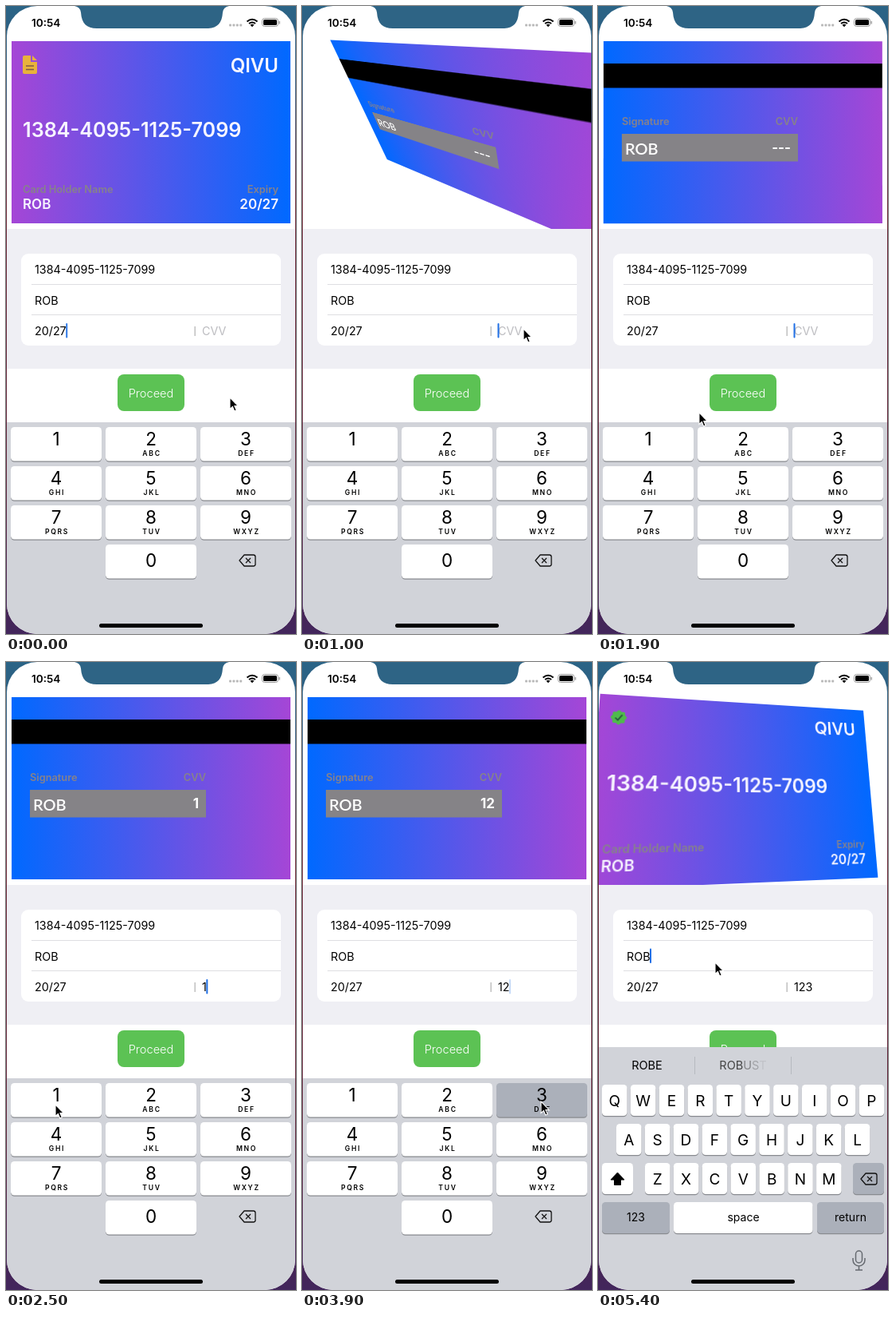
Write an HTML page that moves like this. It is 364 px wide and 786 px high and loops after 5.5 s.

```html
<!DOCTYPE html>
<html lang="en">
<head>
<meta charset="utf-8">
<title>Card form</title>
<style>
html, body { margin: 0; width: 100%; height: 100%; overflow: hidden; }
body { background: linear-gradient(#2b6486, #31587c 12%, #6a2434 32%, #5c2138 75%, #42265c); }
#screen { position: absolute; left: 1px; top: 0; width: 362px; height: 786px; border-radius: 38px; overflow: hidden; background: #fff; }
svg { position: absolute; font-family: Inter, "Open Sans", sans-serif; }
#ui { left: -1px; top: 0; }
.card { left: 6px; top: 44px; overflow: visible; }
</style>
</head>
<body>
<div id="screen">
  <svg class="card" id="front" width="350" height="228"></svg>
  <svg class="card" id="back" width="350" height="228"></svg>
  <svg id="ui" width="364" height="786"></svg>
</div>
<script>
const $ = id => document.getElementById(id);
const NAME = 'ROB', NUMBER = '1384-4095-1125-7099', EXPIRY = '20/27';

const text = (x, y, size, str, attrs = '') => `<text x="${x}" y="${y}" font-size="${size}" ${attrs}>${str}</text>`;
const rect = (x, y, w, h, fill, r = 0, attrs = '') =>
  `<rect x="${x}" y="${y}" width="${w}" height="${h}" rx="${r}" fill="${fill}" ${attrs}/>`;
const gradient = (id, from, to) => `<linearGradient id="${id}"><stop stop-color="${from}"/>
  <stop offset="1" stop-color="${to}"/></linearGradient>${rect(0, 0, 350, 228, `url(#${id})`)}`;
const MID = 'text-anchor="middle"', WHITE = 'fill="#f7f5ff" font-weight="600"',
  LABEL = 'fill="#87828a" font-weight="600"', END = 'text-anchor="end"';

// Card faces
const seal = Array.from({ length: 32 }, (_, i) => {
  const a = i * Math.PI / 16, r = 8.6 + 0.9 * Math.cos(8 * a);
  return `${(23 + r * Math.cos(a)).toFixed(1)},${(29 + r * Math.sin(a)).toFixed(1)}`;
}).join(' ');

$('front').innerHTML = gradient('frontFill', '#a546d6', '#0069ff') +
  `<g id="pending"><path d="M16 18h8v8h8v13q0 2-2 2H16q-2 0-2-2V20q0-2 2-2zM26 18l6 6h-6z" fill="#e8b23c"/>
   <path d="M18 31h10M18 35.500h10" stroke="#7d5a48" stroke-width="1.500"/></g>
   <g id="ready"><polygon points="${seal}" fill="#4fba4c"/>
   <path d="M19 29.500l3 3 5-7" fill="none" stroke="#24503c" stroke-width="1.700"/></g>` +
  text(335, 38.5, 24, 'QIVU', `${WHITE} ${END}`) +
  text(14, 119.5, 25.2, NUMBER, WHITE) +
  text(14, 190, 12.8, 'Card Holder Name', LABEL) + text(14, 210, 17, NAME, WHITE) +
  text(335, 190, 12.8, 'Expiry', `${LABEL} ${END}`) + text(335, 210, 17, EXPIRY, `${WHITE} ${END}`);

$('back').innerHTML = gradient('backFill', '#0069ff', '#a546d6') +
  rect(0, 28, 350, 30.5, '#000') + rect(23, 116, 221, 34.5, '#858387') +
  text(23, 105, 12.8, 'Signature', LABEL) + text(244, 105, 12.8, 'CVV', `${LABEL} ${END}`) +
  text(27, 142, 20, NAME, 'fill="#fff" font-weight="600" style="font-family:Lato,cursive"') +
  text(235, 139.5, 17, '', `fill="#fff" font-weight="700" ${END} id="cardCvv"`);

// Keyboards
const SHADOW = '#898b90', GREY = '#abb0ba';
const key = (x, y, w, h, fill = '#fff', id = '') =>
  rect(x, y + 1.2, w, h, SHADOW, 4.5) + rect(x, y, w, h, fill, 4.5, id && `id="${id}"`);
const erase = (x, y) => `<path d="M${x - 10} ${y}l6-7h11.500q2.500 0 2.500 2.500v9q0 2.500-2.500 2.500H${x - 4}z
  M${x - 2} ${y - 3}l6 6m0-6l-6 6" fill="none" stroke="#111" stroke-width="1.300" stroke-linejoin="round"/>`;

const padLetters = ['', 'ABC', 'DEF', 'GHI', 'JKL', 'MNO', 'PQRS', 'TUV', 'WXYZ'];
let pad = rect(0, 521, 364, 265, '#d1d3d9');
padLetters.forEach((letters, i) => {
  const x = 6 + i % 3 * 119, y = 527 + Math.floor(i / 3) * 49;
  pad += key(x, y, 114, 42.5, '#fff', 'key' + (i + 1)) + text(x + 57, y + 23, 22.5, i + 1, MID) +
    text(x + 58, y + 36, 8.6, letters, `${MID} font-weight="600" letter-spacing="1.700"`);
});
pad += key(125, 674, 114, 42.5) + text(182, 702, 22.5, 0, MID) + erase(303, 694);

const letterRow = (chars, x, y) => [...chars].map((c, i) =>
  key(x + i * 35.85, y, 31.5, 39) + text(x + i * 35.85 + 15.75, y + 26.5, 19, c, MID)).join('');
const faded = [...'UST'].map((c, i) => `<tspan fill-opacity="${0.55 - i * 0.22}">${c}</tspan>`).join('');
const letterKeys = rect(0, 482, 364, 304, '#d1d3d9') +
  rect(121, 494, 1, 22, '#b7bac0') + rect(242, 494, 1, 22, '#b7bac0') +
  text(61.5, 510, 14.5, 'ROBE', MID) + text(182, 510, 14.5, NAME + faded, `${MID} fill="#444"`) +
  letterRow('QWERTYUIOP', 5, 529) + letterRow('ASDFGHJKL', 23, 578) + letterRow('ZXCVBNM', 59, 627) +
  key(5, 627, 39, 39) + '<path d="M24.500 639l8.500 9h-4.500v6.500h-8V648H16z" stroke="#000" stroke-linejoin="round"/>' +
  key(320, 627, 39, 39, GREY) + erase(340, 647) +
  key(5, 676, 85, 39, GREY) + text(47.5, 700, 14, '123', MID) +
  key(95, 676, 174.5, 39) + text(182.5, 699.5, 14, 'space', MID) +
  key(275, 676, 84, 39, GREY) + text(317, 699.5, 14, 'return', MID) +
  `<g fill="none" stroke="#666a70" stroke-width="1.500">${rect(323.5, 737, 8, 15, 'none', 4)}
   <path d="M320 746v2.500a7.500 7.500 0 0 0 15 0V746M327.500 756v5M323 761h9"/></g>`;

// Form, status bar and pointer
const FIELD = 14.3;
$('ui').innerHTML =
  rect(0, 279, 364, 175, '#efeff4') + rect(0, 454, 364, 67, '#fff') + rect(19, 310, 326, 115, '#fff', 9) +
  rect(32, 348, 313, 1, '#dedee2') + rect(32, 386, 313, 1, '#dedee2') +
  text(36, 334.5, FIELD, NUMBER) +
  text(36, 373.5, FIELD, NAME, 'id="name"') + text(36, 412, FIELD, EXPIRY, 'id="expiry"') +
  rect(236.6, 401, 1.1, 12, '#aaa') +
  text(246, 412, FIELD, 'CVV', 'id="hint" fill="#bcbcc0"') + text(246, 412, FIELD, '', 'id="cvv"') +
  rect(0, 0, 2, 18.5, '#1f6fe5', 1, 'id="caret"') +
  rect(140, 461, 84, 46, '#5cc254', 8) + text(182, 489.5, 14.6, 'Proceed', `${MID} fill="#fff" font-weight="300"`) +
  `<g>${pad}</g><g id="letters">${letterKeys}</g>` + rect(117, 773, 130, 5, '#000', 2.5) +
  '<path d="M86 0Q93 1 94 8C95 22 101 28 114 28H252C265 28 271 22 272 8Q273 1 280 0Z" fill="#2e6485"/>' +
  text(32, 25.5, 13.6, '10:54', 'font-weight="600"') +
  [0, 1, 2, 3].map(i => rect(280 + i * 4.4, 22.5, 3, 3, '#b9b9b9', 1)).join('') +
  `<g fill="none" stroke="#000" stroke-width="2"><path d="M302.500 19.500q6.500-5.500 13 0M305 22q4-3 8 0"/></g>
   <path d="M306.500 23.600q2.500-1.600 5 0l-2.500 2.600z"/>` +
  rect(321.5, 15.5, 20, 10, 'none', 3, 'stroke="#999"') + rect(323, 17, 17, 7, '#000', 1.6) + rect(342.7, 19, 1.3, 3.5, '#999') +
  '<path id="pointer" d="M0 0V14.500L3.400 11.500L5.700 17L8.200 16L5.900 10.600H10.300Z" stroke="#fff" stroke-width="1.100"/>';

// Timeline, in seconds
const FLIP = 0.698, UNFLIP = 4.96;
const typed = [2.4, 3.05, 3.92];
const pointerPath = [[0, 281, 490], [0.1, 281, 490], [0.55, 278, 404], [1.55, 278, 404], [2.1, 62, 554], [2.5, 62, 554],
  [2.9, 168, 553], [3.3, 168, 553], [3.7, 300, 550], [4, 300, 550], [4.7, 139, 360], [4.8, 139, 360], [4.95, 147, 376], [5.5, 147, 376]];

const clamp = v => Math.max(0, Math.min(1, v));
const smooth = v => v * v * (3 - 2 * v);

function spring(t) {
  if (t <= 0) return 0;
  const damping = 0.7, omega = 2 * Math.PI, k = Math.sqrt(1 - damping * damping), a = omega * k * t;
  return 1 - Math.exp(-damping * omega * t) * (Math.cos(a) + damping / k * Math.sin(a));
}

function pointerAt(t) {
  const i = Math.max(1, pointerPath.findIndex(p => p[0] >= t));
  const [t0, x0, y0] = pointerPath[i - 1], [t1, x1, y1] = pointerPath[i];
  const s = smooth(clamp((t - t0) / (t1 - t0)));
  return [x0 + (x1 - x0) * s, y0 + (y1 - y0) * s];
}

function placeCaret(t) {
  const [field, y] = t < FLIP ? ['expiry', 397] : t < UNFLIP ? ['cvv', 397] : ['name', 358.5];
  const since = [-0.523, FLIP, ...typed, UNFLIP].filter(s => s <= t).pop();
  const phase = (t - since) % 1;
  const el = $(field), x = +el.getAttribute('x') + (el.textContent ? el.getComputedTextLength() : 0);
  $('caret').setAttribute('transform', `translate(${x - 0.5} ${y})`);
  $('caret').setAttribute('opacity', clamp((Math.abs(phase - 0.7) - 0.14) / 0.04));
}

function turn(id, angle) {
  const style = $(id).style;
  style.transform = `perspective(350px) rotate3d(1,1,0,${angle}deg)`;
  style.visibility = Math.abs(angle) < 90 ? 'visible' : 'hidden';
}

function draw() {
  const t = Math.floor(performance.now() % 5500 / 100) / 10;
  const angle = 180 * (spring(t - FLIP) - spring(t - UNFLIP));
  turn('front', angle);
  turn('back', angle - 180);

  const cvv = '123'.slice(0, typed.filter(s => s <= t).length);
  $('cvv').textContent = cvv;
  $('cardCvv').textContent = cvv || '---';
  $('hint').style.display = cvv ? 'none' : '';
  $('pending').style.display = cvv.length < 3 ? '' : 'none';
  $('ready').style.display = cvv.length < 3 ? 'none' : '';
  typed.forEach((s, i) => $('key' + (i + 1)).setAttribute('fill', t >= s - 0.12 && t < s + 0.05 ? GREY : '#fff'));

  $('letters').setAttribute('opacity', clamp((t - UNFLIP) / 0.3));
  placeCaret(t);
  $('pointer').setAttribute('transform', `translate(${pointerAt(t)})`);
  requestAnimationFrame(draw);
}
draw();
</script>
</body>
</html>
```
